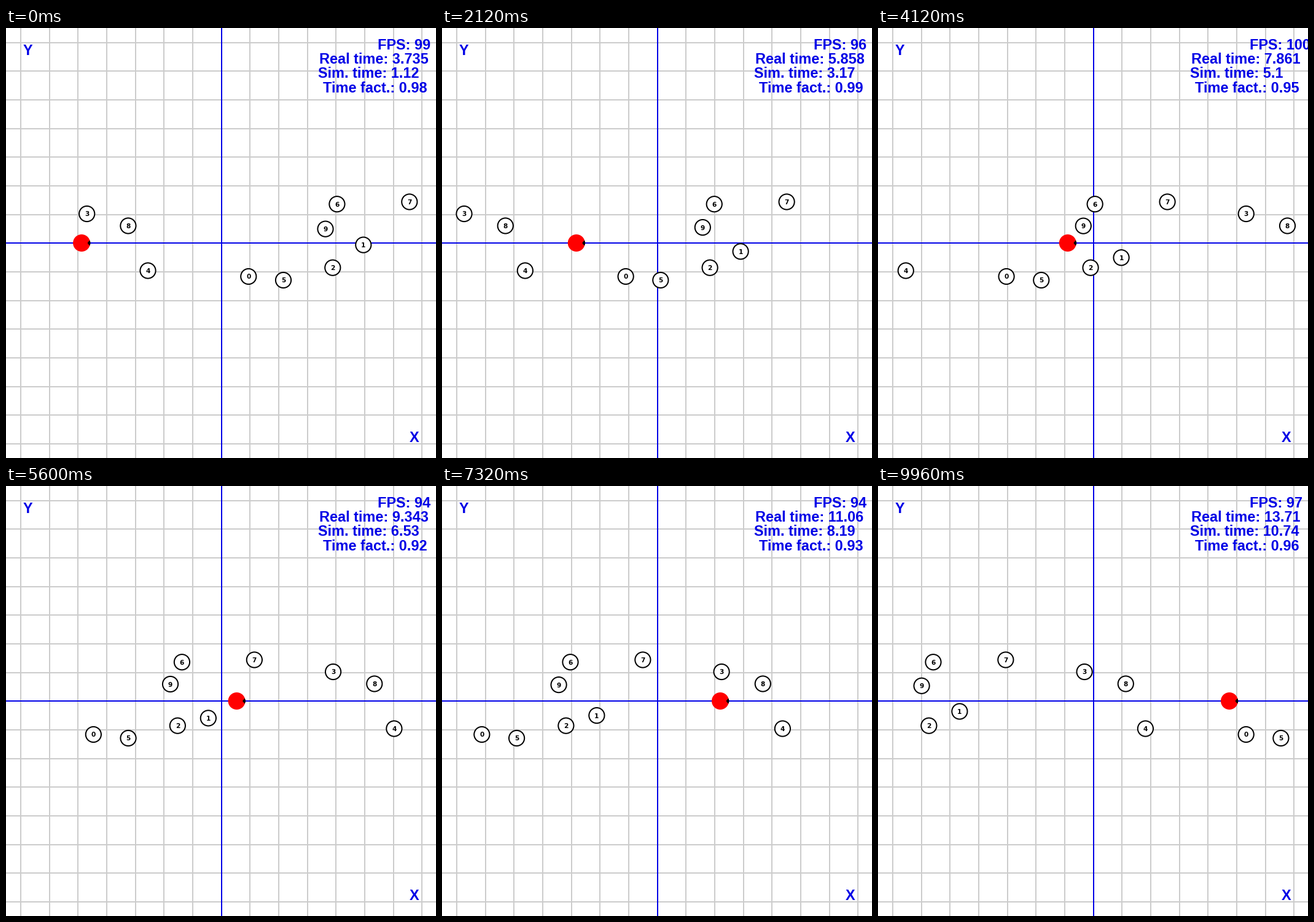
A matplotlib script for the animation above (10000 ms loop, 700 by 700 pixels).

```python
import random

import matplotlib.pyplot as plt
import numpy as np
from matplotlib.animation import FuncAnimation
from matplotlib.patches import Circle, Polygon, Rectangle

SIZE = 700
STEPS = 250
UNIT = SIZE / 15          # pixels per world unit
BLUE = "#0000e6"
GREY = "#cccccc"
PX = 0.72                 # points per pixel at 100 dpi

SIM_START, SIM_STEP = 1.12, 0.038635
REAL_START, REAL_STEP = 3.735, 0.04006

# Start position of each numbered agent
STARTS = [(394.8, 404.5), (581.8, 353), (531.8, 390.2), (131.7, 302.5),
          (231, 395), (451.5, 410.5), (538.9, 286.7), (656.8, 283),
          (198.9, 322), (520, 327)]

# Agents that step aside: time of passing, y then, speed before and after
DODGES = {1: (6.1, 379, 5.2, -2.6), 9: (5.4, 321.8, -1.25, 0.65)}

fig = plt.figure(figsize=(7, 7), dpi=100, facecolor="white")
ax = fig.add_axes([0, 0, 1, 1])
ax.set_xlim(0, SIZE)
ax.set_ylim(SIZE, 0)
ax.axis("off")


def bar(x, y, w, h, color, z):
    ax.add_patch(Rectangle((x, y), w, h, fc=color, ec="none",
                           antialiased=False, zorder=z))


def label(x, y, text="", ha="left"):
    return ax.text(x, y, text, ha=ha, va="baseline", color=BLUE, zorder=50,
                   family="Liberation Sans", weight="bold", size=23.5 * PX)


def draw_grid():
    for k in range(15):
        v = UNIT * (k + 0.5)
        color, z = (BLUE, 2) if k == 7 else (GREY, 1)
        bar(int(v + 1e-6), 0, 2, SIZE, color, z)
        bar(0, int(np.ceil(v - 1e-6)) - 1, SIZE, 2, color, z)


class Agent:
    def __init__(self, n, start):
        self.x, self.y = start
        self.dodge = DODGES.get(n)
        z = 10 + 2 * n
        self.disc = ax.add_patch(Circle(start, 12.6, fc="white", ec="black",
                                        lw=2 * PX, zorder=z))
        self.digit = ax.text(*start, str(n), ha="center", va="baseline",
                             family="DejaVu Sans", weight="bold",
                             size=10.5 * PX, zorder=z + 1)

    def place(self, t):
        # Walk left at one unit per second and wrap after 14 units
        left = UNIT / 2
        x = self.x - UNIT * (t - SIM_START)
        x = left + (x - left) % (14 * UNIT)
        y = self.y
        if self.dodge:
            passing, y, before, after = self.dodge
            y += (t - passing) * (before if t < passing else after)
        self.disc.center = (x, y)
        self.digit.set_position((x, y + 4))


draw_grid()
label(35.5, 44, "Y", "center")
label(664.5, 674, "X", "center")
hud = [label(605, 35), label(510.5, 58), label(508.5, 81), label(516.5, 105)]

agents = [Agent(n, start) for n, start in enumerate(STARTS)]

robot = ax.add_patch(Circle((0, 0), 14, fc="red", ec="none", zorder=40))
nose_shape = np.array([(9.5, 0), (13, -4.5), (14.3, -2), (14.3, 2), (13, 4.5)])
nose = ax.add_patch(Polygon(nose_shape, fc="black", ec="none", zorder=41))


def update(i):
    t = round(SIM_START + SIM_STEP * i, 2)
    real = round(REAL_START + REAL_STEP * i, 3)
    rng = random.Random(i)

    for agent in agents:
        agent.place(t)
    centre = (350.8 + UNIT * (t - 6), 350)
    robot.center = centre
    nose.set_xy(nose_shape + centre)

    hud[0].set_text(f"FPS: {rng.randint(93, 100)}")
    hud[1].set_text(f"Real time: {str(real)[:5]}")
    hud[2].set_text(f"Sim. time: {t}")
    hud[3].set_text(f"Time fact.: {rng.randint(92, 99) / 100}")


anim = FuncAnimation(fig, update, frames=STEPS, interval=40,
                     repeat=True, repeat_delay=0, blit=False)
plt.show()
```
